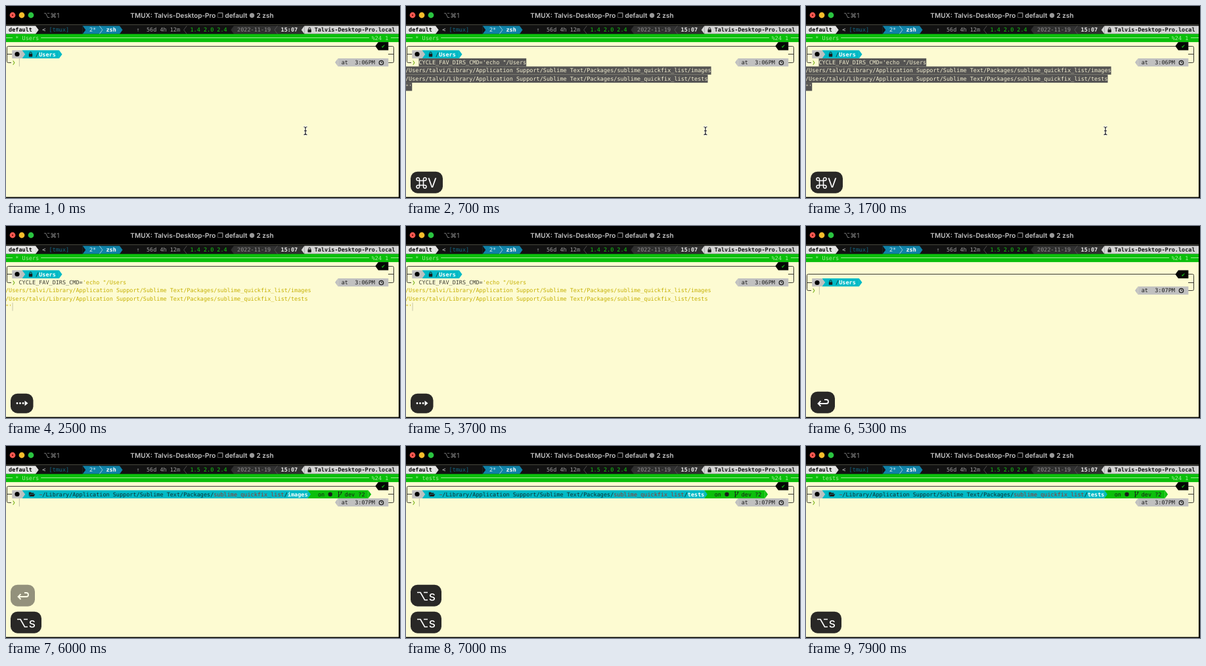
An HTML page for the animation above (8 s loop, 600x293 px).

```html
<!DOCTYPE html>
<html lang="en">
<head>
<meta charset="utf-8">
<title>Terminal session</title>
<style>
  html, body { margin: 0; width: 100%; height: 100%; overflow: hidden; background: #000; }
  svg { display: block; width: 600px; height: 293px; }
  text { font: 8.5px "DejaVu Sans Mono", monospace; white-space: pre; text-rendering: geometricPrecision; }
  .bold { font-weight: 700; }
  .title { font: 600 10px Inter, "DejaVu Sans", sans-serif; }
  .hint { font: 10px Inter, "DejaVu Sans", sans-serif; }
  .key { font: 20px Inter, sans-serif; }
</style>
</head>
<body>
<svg id="stage" viewBox="0 0 600 293"></svg>
<script>
const LOOP = 8000, COL = 5.117, ROW = 12.4, TOP = 30.3;
const PASTE = 300, DESELECT = 2000, ENTER = 4000, LOAD = 5200, FIRST = 5650, SECOND = 6900;
const HOLD = 1850, FADE = 300;
const HOST = 'Talvis-Desktop-Pro';
const PAPER = '#fdfbd2', INK = '#1c1c1c', GREY = '#c0c0c0', CYAN = '#00bac6', GREEN = '#0bbf0b', BLUE = '#0f82a8';

const X = col => col * COL - 1;
const Y = row => TOP + row * ROW;

const rect = (x, y, w, h, fill, extra = '') =>
  `<rect x="${x}" y="${y}" width="${w}" height="${h}" fill="${fill}" ${extra}/>`;
const fillPath = (d, fill) => `<path d="${d}" fill="${fill}"/>`;
const line = (d, color, width = 1) =>
  `<path d="${d}" fill="none" stroke="${color}" stroke-width="${width}"/>`;
const disc = (x, y, r, fill) => `<circle cx="${x}" cy="${y}" r="${r}" fill="${fill}"/>`;
const text = (col, row, str, fill, cls = '') =>
  `<text x="${X(col)}" y="${Y(row) + 9}" fill="${fill}" class="${cls}">${str}</text>`;
const bold = (col, row, str, fill) => text(col, row, str, fill, 'bold');

// A run of cells, and the pointed cell that ends it (dir 1: right, -1: left)
const cells = (a, b, row, fill) => rect(X(a), Y(row), (b - a) * COL, ROW, fill);
const arrow = (col, row, dir) => {
  const base = X(dir > 0 ? col : col + 1), w = dir * 4.6;
  return `M${base} ${Y(row)}l${w} ${ROW / 2}l${-w} ${ROW / 2}`;
};
const tip = (col, row, fill, dir = 1) => fillPath(arrow(col, row, dir), fill);
const chevron = (col, row, color, dir = 1) => line(arrow(col, row, dir), color, .7);

function lock(col, row) {
  const x = X(col), y = Y(row);
  return rect(x, y + 5.5, 5.4, 4.4, INK, 'rx=".6"') +
    line(`M${x + 1.2} ${y + 6}v-1.6a1.5 1.7 0 0 1 3 0v1.6`, INK, 1);
}

function chrome() {
  return rect(0, 0, 600, 293, '#000') +
    disc(10, 14, 4.4, '#ff5a52') + disc(10, 14, 1.2, '#7d1410') +
    disc(24, 14, 4.4, '#f6bd2c') + disc(38, 14, 4.4, '#2ac440') +
    '<text x="57" y="17.5" class="hint" fill="#8c8c8c">⌥⌘1</text>' +
    `<text x="298.5" y="17.5" text-anchor="middle" class="title" fill="#c6c6c6">TMUX: ${HOST} ❐ default <tspan fill="#999">●</tspan> 2 zsh</text>` +
    rect(0, 28.5, 598, 263, PAPER);
}

function status(t) {
  const dim = '#8f8f8f', slate = '#303030';
  return rect(0, 28.5, 598, 14.5, '#121212') +
    cells(0, 9, 0, '#e6e6e6') + tip(9, 0, '#e6e6e6') + bold(1, 0, 'default', '#000') +
    text(11, 0, '&lt;', '#ddd') + text(13, 0, '[tmux]', '#146c8b') +
    cells(23, 34, 0, BLUE) + tip(23, 0, '#121212') + tip(34, 0, BLUE) +
    text(25, 0, '2*', '#d8eef5') + chevron(28, 0, '#d8eef5') + bold(30, 0, 'zsh', '#fff') +
    text(39, 0, '↑', dim) + text(42, 0, '56d 4h 12m', '#a0a0a0') + chevron(53, 0, '#666', -1) +
    text(55, 0, `1.${t < LOAD ? 4 : 5} 2.0 2.4`, '#13c813') +
    cells(68, 89, 0, slate) + tip(67, 0, slate, -1) + text(69, 0, '2022-11-19', dim) +
    chevron(80, 0, '#666', -1) + bold(82, 0, '15:07', '#eee') +
    tip(88, 0, '#d4d4d4', -1) + rect(X(89), Y(0), 598 - X(89), ROW, '#d4d4d4') +
    lock(90, 0) + bold(92, 0, HOST + '.local', '#111');
}

function paneBar(name) {
  const pale = '#a4ec98';
  return rect(0, Y(1), 598, ROW, GREEN) +
    line(`M0 48.5H10M${X(5 + name.length) + 3} 48.5H553M586 48.5H598`, pale) +
    text(3, 1, '* ' + name, pale) + text(109, 1, '%24 1', pale);
}

function directory(row, name) {
  if (name === '/')
    return cells(5, 16, row, CYAN) + tip(16, row, CYAN) + lock(7, row) +
      text(9, row, '/', INK) + bold(10, row, 'Users', '#fff');
  const end = 84 + name.length, x = X(7), y = Y(row), b = X(end + 9) + 1;
  return cells(5, end, row, CYAN) + cells(end, end + 18, row, GREEN) +
    tip(end, row, CYAN) + tip(end + 18, row, GREEN) +
    fillPath(`M${x} ${y + 9}v-6h3l1 1h3.5v1.4h-5zM${x + .6} ${y + 9.4}l2-3.4h7l-2 3.4z`, INK) +
    text(10, row, '~', '#983030') +
    text(11, row, '/Library/Application Support/Sublime Text/Packages/', '#102c30') +
    text(62, row, 'sublime_quickfix_list', '#9c352f') + text(83, row, '/', INK) +
    bold(84, row, name, '#fff') + text(end + 3, row, 'on', INK) +
    disc(X(end + 6) + 3.5, y + 6.3, 3.2, INK) +
    line(`M${b} ${y + 3}v7M${b} ${y + 8}q4 -1 4 -4.5`, INK, 1) +
    disc(b, y + 2.8, 1, INK) + disc(b, y + 9.8, 1, INK) + disc(b + 4, y + 3, 1, INK) +
    text(end + 11, row, 'dev ?2', INK);
}

function prompt(row, name, time) {
  const mid = r => Math.floor(Y(r) + ROW / 2) + .5;
  const y0 = mid(row), y1 = mid(row + 1), y2 = mid(row + 2), cx = X(111) + 4.5;
  return line(`M563 ${y0}H3.5Q1.5 ${y0} 1.5 ${y0 + 2}V${y2 - 2}Q1.5 ${y2} 3.5 ${y2}H8M1.5 ${y1}H9M582 ${y1}H590.5` +
      `M582 ${y0}H588.5Q590.5 ${y0} 590.5 ${y0 + 2}V${y2 - 2}Q590.5 ${y2} 588.5 ${y2}H582`, '#3a3932') +
    cells(111, 114, row, '#050505') + tip(110, row, '#050505', -1) + text(112, row, '✔', '#18c818') +
    directory(row + 1, name) +
    cells(2, 5, row + 1, GREY) + tip(5, row + 1, GREY) + disc(17, y1, 3.6, '#000') +
    cells(99, 114, row + 2, GREY) + tip(98, row + 2, GREY, -1) +
    text(100, row + 2, 'at', INK) + text(104, row + 2, time, INK) +
    `<circle cx="${cx}" cy="${y2}" r="3.2" fill="none" stroke="${INK}" stroke-width="1.3"/>` +
    line(`M${cx} ${y2 - 2}v2.2h1.6`, INK, .8) +
    bold(2, row + 2, '❯', '#7db51e');
}

const caret = (col, row) => rect(X(col) + .4, Y(row), .8, ROW, '#b9b7a2');

function command(selected) {
  const base = '/Users/talvi/Library/Application Support/Sublime Text/Packages/sublime_quickfix_list/';
  const assign = 'CYCLE_FAV_DIRS_CMD=', string = `'echo "/Users`;
  const rows = [[4, assign + string], [0, base + 'images'], [0, base + 'tests'], [0, `"'`]];
  if (selected)
    return rows.map(([col, str], i) =>
      cells(col, col + str.length, 4 + i, '#555453') + text(col, 4 + i, str, '#f1edcf')).join('');
  const gold = '#c6b000';
  return text(4, 4, assign, '#3c3b34') + text(4 + assign.length, 4, string, gold) +
    rows.slice(1).map(([col, str], i) => text(col, 5 + i, str, gold)).join('') + caret(2, 7);
}

const pointer = ['#fff', '#222'].map((color, i) =>
  line('M453.5 184.5q2.5 0 2.5 2v8q0 2 -2.5 2M458.5 184.5q-2.5 0 -2.5 2M458.5 196.5q-2.5 0 -2.5 -2M454 190.5h4',
    color, i ? 1.2 : 2.8)).join('');

// Key caps, drawn from the lower left corner of the screen
const option = line('M17 264.5h5l6.5 11.5h4.5M27 264.5h6', '#fff', 1.7) +
  '<text x="34.5" y="276.5" class="key" fill="#fff">s</text>';
const commandSign = line('M20.5 266.5h6v7h-6zM20.5 266.5h-2.2a2.3 2.3 0 1 1 2.2 -2.3zM26.5 266.5h2.2a2.3 2.3 0 1 0 -2.2 -2.3z' +
  'M20.5 273.5h-2.2a2.3 2.3 0 1 0 2.2 2.3zM26.5 273.5h2.2a2.3 2.3 0 1 1 -2.2 2.3z', '#fff', 1.5);
const dots = [17, 21.5, 26].map(x => disc(x, 270.5, 1.4, '#fff')).join('');

// Press time, width, height, face
const KEYS = [
  [PASTE, 49, 33, commandSign + '<text x="33" y="277" class="key" fill="#fff">V</text>'],
  [DESELECT, 34.5, 30, dots + fillPath('M28.5 266.5l5 4l-5 4z', '#fff')],
  [ENTER, 37, 33, line('M20 271h11q3 0 3 -3t-3 -3h-3M22.5 267l-4 4l4 4', '#fff', 1.8)],
  [FIRST - 50, 47, 33, option],
  [SECOND - 50, 47, 33, option]
];

function keyCaps(t) {
  return KEYS.map(([start, width, height, face], i) => {
    const opacity = Math.min(1, 1 - (t - start - HOLD) / FADE);
    if (t < start || opacity <= 0) return '';
    const newer = KEYS.slice(i + 1).filter(key => key[0] <= t).length;
    return `<g opacity="${opacity}" transform="translate(0 ${-41 * newer})">` +
      rect(7, 285.7 - height, width, height, '#292826', 'rx="10.5"') + face + '</g>';
  }).join('');
}

function scene(t) {
  const entered = t >= ENTER + 100;
  const dir = t < FIRST ? '/' : t < SECOND ? 'images' : 'tests';
  const row = entered && t < FIRST ? 3 : 2;
  const typed = t >= PASTE && !entered;
  return chrome() + status(t) + paneBar(t < SECOND ? 'Users' : dir) +
    prompt(row, dir, entered ? '3:07PM' : '3:06PM') +
    (typed ? command(t < DESELECT) : caret(4, row + 2)) +
    (t < DESELECT ? pointer : '') + keyCaps(t);
}

const stage = document.getElementById('stage');
let last = '';
function draw(now) {
  const markup = scene(now % LOOP);
  if (markup !== last) stage.innerHTML = last = markup;
  requestAnimationFrame(draw);
}
draw(performance.now());
</script>
</body>
</html>
```
